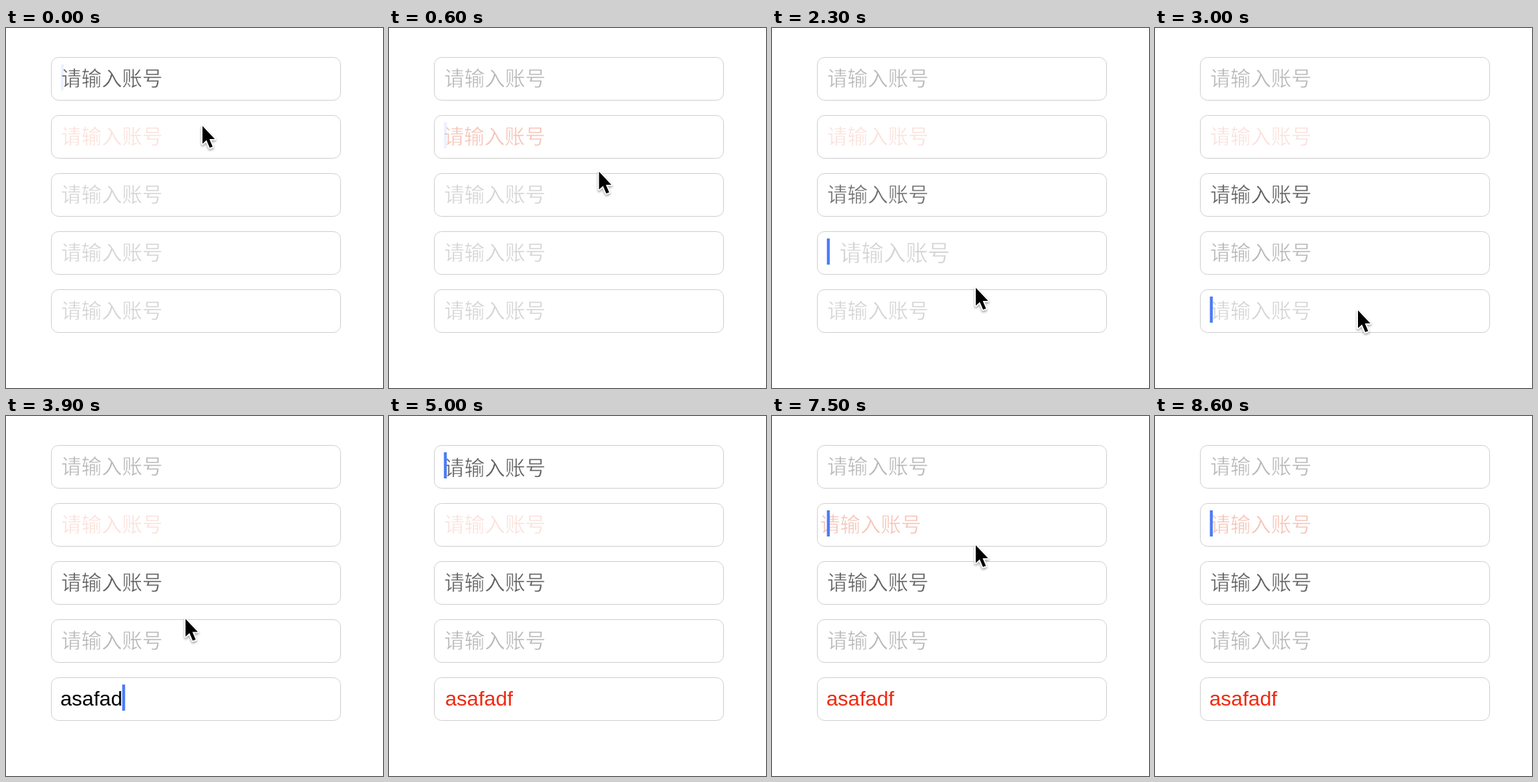
These frames come from a looping animation (520x496 px, 8700 ms). An HTML page:

```html
<!DOCTYPE html>
<html lang="zh-CN">
<head>
<meta charset="utf-8">
<title>Text fields</title>
<style>
  html, body { margin: 0; width: 100%; height: 100%; overflow: hidden; background: #fff; }
  svg { display: block; }
  .box { fill: #fff; stroke: #d1d1d1; }
  /* the white outline thins the strokes of the glyphs */
  .hint { font: 300 28px "Noto Sans CJK SC", "Noto Sans CJK", sans-serif; stroke: #fff; stroke-width: .4; }
  .typed { font: 28.5px "Liberation Sans", Arial, sans-serif; }
  #arrow { fill: #000; stroke: #fff; stroke-width: 3.6; paint-order: stroke; stroke-linejoin: round;
    filter: drop-shadow(0 2px 1.5px rgba(0, 0, 0, .35)); }
</style>
</head>
<body>
<svg width="520" height="496" viewBox="0 0 520 496">
  <g id="fields"></g>
  <rect id="caret" width="4" height="36" fill="#4a7af6"/>
  <path id="arrow" d="M1 1V25.5L6.5 20.5L11 31L15 29.5L10.5 19H18Z"/>
</svg>
<script>
const LOOP = 8700, STEP = 100, LEFT = 76;
const PALE = '#d3d3d3', GRAY = '#b6b6b6', DARK = '#5c5c5c';
const PINK_PALE = '#fbe1da', PINK = '#f6c3b6', RED = '#ee2a10';
const WORD = 'asafadf', TYPE_START = 3200, KEY_TIME = 140;

const clicks = [
  { at: -500, field: 0 }, { at: 100, field: 1 }, { at: 1000, field: 2 }, { at: 1900, field: 3 },
  { at: 2800, field: 4 }, { at: 4700, field: 0 }, { at: 7400, field: 1 }
];
const home = [270, 134];
const moves = [
  { at: 100, ms: 800, to: [297, 225] },
  { at: 1000, ms: 400, to: [283, 280] },
  { at: 1500, ms: 1250, to: [279, 388] },
  { at: 3600, ms: 750, to: [262, 71], bow: -30 },
  { at: 4500, ms: 200, to: [408, -50] },
  { at: 6550, ms: 450, to: [284, 272] },
  { at: 7000, ms: 300, to: [280, 177] },
  { at: 7600, ms: 600, to: [400, -50] }
];

const $ = id => document.getElementById(id);
const clamp = p => Math.min(1, Math.max(0, p));
const easeInOut = p => Math.sin(p * Math.PI / 2) ** 2;
const easeInBack = p => p * p * (7 * p - 6);
const fieldTop = i => 40 + 80 * i;

function set(el, attrs) {
  for (const name in attrs) el.setAttribute(name, attrs[name]);
}
function add(tag, attrs, text = '') {
  const el = document.createElementNS('http://www.w3.org/2000/svg', tag);
  set(el, attrs);
  el.textContent = text;
  return $('fields').appendChild(el);
}

const hints = Array.from({ length: 5 }, (_, i) => {
  add('rect', { class: 'box', x: 62.5, y: fieldTop(i) + .5, width: 399, height: 59, rx: 10 });
  return add('text', { class: 'hint', y: 10 }, '请输入账号');
});
const typed = add('text', { class: 'typed', y: 399 });

function shake(size, ms) {
  const s = ms / 1000;
  return s < 0 || s > .8 ? 0 : -size * Math.exp(-8 * s) * Math.sin(5 * Math.PI * s);
}

// dips quickly, then recovers slowly
function dip(ms) {
  const x = Math.max(0, ms / 400);
  return 1 - .88 * (x * Math.exp(1 - x)) ** 2;
}

function blink(ms) {
  const phase = ms % 1000;
  return phase < 500 ? 1 : phase < 600 ? .1 : 0;
}

function arrowAt(t) {
  let [x, y] = home;
  for (const { at, ms, to, bow = 0 } of moves) {
    const p = easeInOut(clamp((t - at) / ms));
    x += (to[0] - x) * p + bow * Math.sin(Math.PI * p);
    y += (to[1] - y) * p;
  }
  return [x, y];
}

function placeHint(i, { x = 0, y = 0, scale = 1, fill = PALE, opacity = 1 }) {
  const transform = `translate(${LEFT + x} ${fieldTop(i) + 30 + y}) scale(${scale})`;
  set(hints[i], { transform, fill, opacity });
}

function draw(t) {
  const { at, field } = clicks.filter(c => c.at <= t).pop();
  const letters = t < TYPE_START ? 0 : Math.min(WORD.length, 1 + Math.floor((t - TYPE_START) / KEY_TIME));
  const zoom = easeInBack(clamp((t - 1900) / 400)) * (1 - clamp((t - 2800) / 200));

  placeHint(0, { y: shake(22, t - 4700), fill: field === 0 ? DARK : GRAY });
  placeHint(1, { x: field === 1 ? shake(22, t - at) : 0, fill: field === 1 ? PINK : PINK_PALE });
  placeHint(2, { fill: t < 1000 ? PALE : DARK, opacity: dip(t - 1000) });
  placeHint(3, { x: 17 * zoom, scale: 1 + .09 * zoom, fill: t < 2800 ? PALE : GRAY });
  placeHint(4, { opacity: letters ? 0 : 1 });

  typed.textContent = WORD.slice(0, letters);
  set(typed, { x: LEFT - 1 + shake(27, t - 4700), fill: t < 4700 ? '#000' : RED });

  const typing = field === 4 && letters > 0;
  const lastKey = typing ? TYPE_START + (letters - 1) * KEY_TIME : at;
  set($('caret'), {
    x: LEFT - .3 + (typing ? typed.getComputedTextLength() - 1 : 0),
    y: fieldTop(field) + 10,
    opacity: blink(t - lastKey)
  });
  set($('arrow'), { transform: `translate(${arrowAt(t)})` });
}

const start = performance.now();
function tick() {
  const t = Math.max(0, performance.now() - start) % LOOP;
  draw(Math.floor(t / STEP) * STEP);
  requestAnimationFrame(tick);
}
tick();
</script>
</body>
</html>
```
